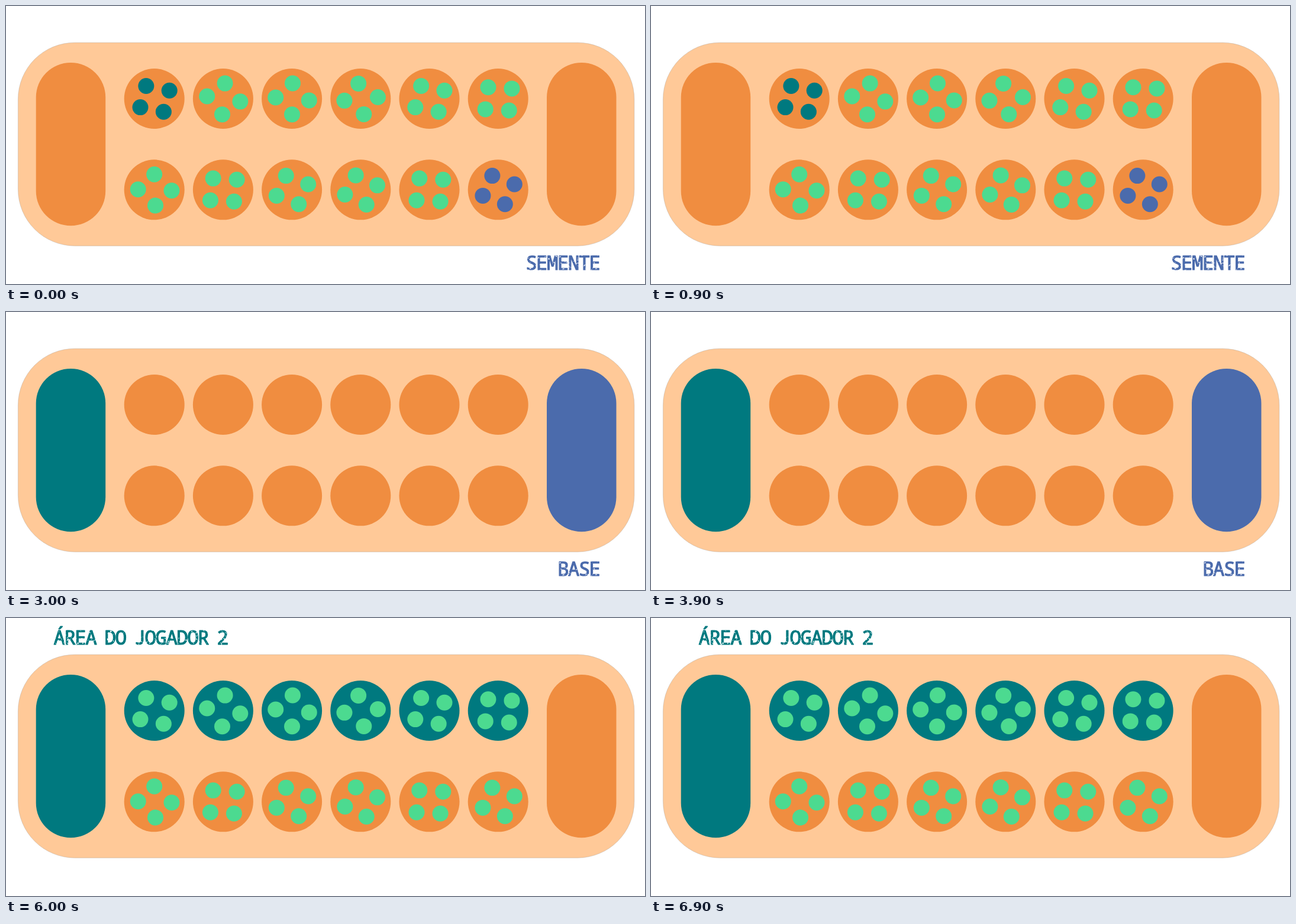
Recreate the animation shown at these times as an HTML page. Size 1080 by 471 pixels, loop 7.5 s.

```html
<!DOCTYPE html>
<html lang="pt">
<head>
<meta charset="utf-8">
<title>Tabuleiro de mancala</title>
<style>
  html, body { margin: 0; width: 100%; height: 100%; overflow: hidden; background: #fff; }
  svg { display: block; width: 100vw; height: 100vh; }
  text {
    font: 400 32.5px "Noto Sans Mono", "DejaVu Sans Mono", monospace;
    letter-spacing: -1.6px;
    word-spacing: -3.5px;
    stroke-width: 1.2px;
    stroke-linejoin: round;
  }
  #caption { text-anchor: end; }
</style>
</head>
<body>
<svg id="stage" viewBox="0 0 1080 471">
  <rect x="20.4" y="62" width="1041.5" height="344.4" rx="96" fill="#ffc998" stroke="#777" stroke-opacity=".5" stroke-width=".5"/>
  <g id="board"></g>
  <text id="title" x="80.5" y="45"></text>
  <text id="caption" x="1003.5" y="447.3"></text>
  <g id="scratches" stroke="#fff" stroke-linecap="round"></g>
</svg>
<script>
const ORANGE = "#f08d40", TEAL = "#00797f", BLUE = "#4b6bac", GREEN = "#4cda90";
const SCENE_MS = 1500;
const STORE = { y: 96, width: 117.5, height: 276.3, rx: 58.7 };

// Each player owns a row; every pit holds the same ring of seeds, tilted by some degrees.
const players = [
  { color: TEAL, storeX: 50.7, y: 157, chosen: 0, tilts: [-30, 9, 5, -6, -30, -38] },
  { color: BLUE, storeX: 914, y: 311.3, chosen: 5, tilts: [2, -38, -20, -16, -38, -20] }
];

// Highlights name what takes the player's colour.
const scenes = [
  { caption: "SEMENTE", seeds: true, highlight: "seeds" },
  { caption: "BURACO", highlight: "pit" },
  { caption: "BASE", highlight: "stores" },
  { caption: "ÁREA DO JOGADOR 1", seeds: true, highlight: "area", owner: players[1] },
  { title: "ÁREA DO JOGADOR 2", seeds: true, highlight: "area", owner: players[0] }
];

const byId = id => document.getElementById(id);

function add(parent, tag, attributes) {
  const node = document.createElementNS("http://www.w3.org/2000/svg", tag);
  for (const name in attributes) node.setAttribute(name, attributes[name]);
  return parent.appendChild(node);
}

const circle = (cx, cy, r) => add(byId("board"), "circle", { cx, cy, r });

// Four seeds on two crossing diagonals, the first slightly longer.
function addSeeds(x, y, tilt) {
  return [0, 86, 180, 266].map((turn, i) => {
    const angle = (tilt + turn) * Math.PI / 180;
    const radius = i % 2 ? 26.4 : 28.4;
    return circle(x + 0.9 + radius * Math.cos(angle), y + 0.4 + radius * Math.sin(angle), 13.5);
  });
}

for (const player of players) {
  player.store = add(byId("board"), "rect", { x: player.storeX, ...STORE });
  player.pits = player.tilts.map((tilt, column) => {
    const x = 250.7 + 116.2 * column;
    return { hole: circle(x, player.y, 51), seeds: addSeeds(x, player.y, tilt) };
  });
}

// White nicks give the lettering its worn look.
let state = 17;
const random = () => (state = state * 16807 % 2147483647) / 2147483647;

function scratch(left, top) {
  for (let i = 0; i < 170; i++) {
    const x = left + random() * 295, y = top + random() * 30;
    add(byId("scratches"), "path", {
      d: `M${x} ${y}l${random() * 4 - 2} ${random() * 4 - 2}`,
      "stroke-width": 0.5 + random() * 0.9
    });
  }
}
scratch(80, 16);
scratch(712, 419);

function label(id, text = "", color) {
  const node = byId(id);
  node.textContent = text;
  node.setAttribute("fill", color);
  node.setAttribute("stroke", color);
}

function show({ title, caption, seeds: seedsShown, highlight, owner }) {
  for (const player of players) {
    const paint = (node, lit, plain) => node.setAttribute("fill", lit ? player.color : plain);
    const owned = player === owner;
    paint(player.store, owned || highlight === "stores", ORANGE);
    player.pits.forEach(({ hole, seeds }, column) => {
      const chosen = column === player.chosen;
      paint(hole, owned || (chosen && highlight === "pit"), ORANGE);
      for (const seed of seeds) {
        paint(seed, chosen && highlight === "seeds", GREEN);
        seed.setAttribute("visibility", seedsShown ? "visible" : "hidden");
      }
    });
  }
  label("title", title, TEAL);
  label("caption", caption, BLUE);
}

let current;
const start = performance.now();

function tick() {
  const elapsed = performance.now() - start;
  const scene = scenes[Math.floor(elapsed / SCENE_MS) % scenes.length];
  if (scene !== current) show(current = scene);
  requestAnimationFrame(tick);
}
tick();
</script>
</body>
</html>
```
